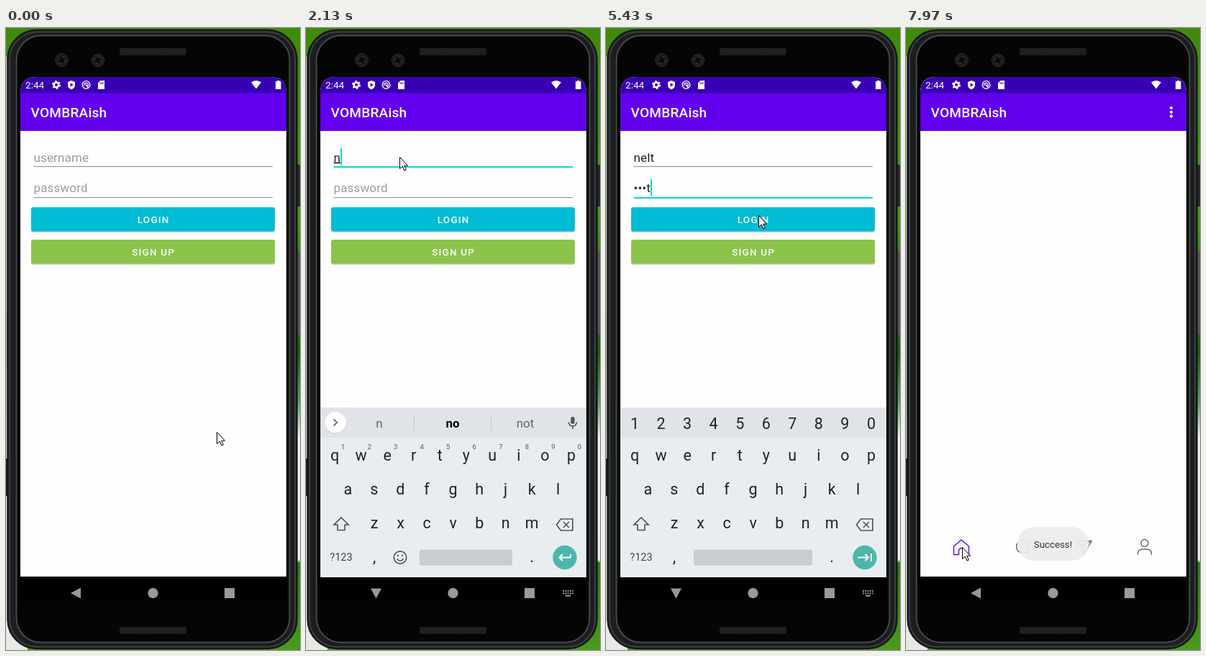
Recreate the animation shown at these times as an HTML page. Size 409x864 px, loop 8000 ms.

```html
<!DOCTYPE html>
<html lang="en">
<head>
<meta charset="utf-8">
<title>Login demo</title>
<style>
  html, body { margin: 0; height: 100%; overflow: hidden; }
  svg { display: block; width: 100vw; height: 100vh; }
  text { font-family: Roboto, sans-serif; white-space: pre; }
  .mid { text-anchor: middle; }
  .field { font-size: 17px; letter-spacing: .15px; fill: #222; }
  .hint { fill: #9c9c9c; }
  .title { font-size: 19px; font-weight: 500; letter-spacing: .24px; fill: #fff; }
  .button { font-size: 13.5px; font-weight: 500; letter-spacing: 1.2px; fill: #fff; text-anchor: middle; }
  .key { font-size: 21.5px; fill: #14262d; text-anchor: middle; }
  .sup { font-size: 9.5px; fill: #4a5860; text-anchor: middle; }
  .word { font-size: 17px; fill: #5c676d; text-anchor: middle; }
  .line { fill: none; stroke: #4c585e; stroke-width: 1.7; }
  .tab { fill: none; stroke: #666; stroke-width: 1.4; }
</style>
</head>
<body>
<svg viewBox="0 0 409 864">
  <defs>
    <clipPath id="screen"><path d="M20 795V90Q20 68 42 68H368Q390 68 390 90V795Z"/></clipPath>
    <clipPath id="loginShape"><rect x="35" y="249" width="339" height="33.500" rx="3"/></clipPath>
    <linearGradient id="wall" x2="0" y2="1">
      <stop offset="0" stop-color="#3f8a0a"/><stop offset=".3" stop-color="#4d9a14"/>
      <stop offset=".52" stop-color="#1f5a0c"/><stop offset=".6" stop-color="#5f9a68"/>
      <stop offset=".66" stop-color="#eef2ef"/><stop offset=".855" stop-color="#e8eeea"/>
      <stop offset=".86" stop-color="#2f7d0c"/><stop offset="1" stop-color="#4a9a1c"/>
    </linearGradient>
    <pattern id="mesh" width="4" height="4" patternUnits="userSpaceOnUse">
      <rect width="4" height="4" fill="#161616"/><path d="M0 4L4 0M0 0L4 4" stroke="#303030" stroke-width=".8"/>
    </pattern>
  </defs>

  <!-- wallpaper and phone body -->
  <rect width="409" height="864" fill="url(#wall)"/>
  <path d="M0 40H1.500V600H0Z" fill="#c9ccc9"/><path d="M0 598H3V650H0Z" fill="#222"/>
  <path d="M0 650H3L30 864H0Z" fill="#e6e9e6"/>
  <path d="M404 190H409V248H404Z" fill="#26282b"/><path d="M404 310H409V426H404Z" fill="#55545c"/>
  <rect x="2" y="2.500" width="403" height="860" rx="41" fill="#1b1d1e" stroke="#141516" stroke-width="1.500"/>
  <rect x="5" y="5.500" width="397" height="854" rx="38" fill="none" stroke="#3c3f41" stroke-width="2"/>
  <rect x="14.500" y="10.500" width="380" height="843" rx="34" fill="#050505" stroke="#4a4d4f" stroke-width="1.800"/>
  <rect x="158" y="28" width="93" height="9.500" rx="2" fill="url(#mesh)"/>
  <rect x="158" y="832" width="93" height="9.500" rx="2" fill="url(#mesh)"/>
  <g fill="#1c1d1f" stroke="#26282a">
    <circle cx="77.500" cy="44.500" r="9"/><circle cx="128" cy="45" r="9"/>
    <g fill="#0c0c0d" stroke="#4a4c50" stroke-dasharray="3 4"><circle cx="77.500" cy="44.500" r="4.500"/><circle cx="128" cy="45" r="4.500"/></g>
  </g>

  <g clip-path="url(#screen)">
    <path d="M20 762H390V796H20Z"/>
    <g id="login">
      <path d="M20 68H390V762H20Z" fill="#fefefe"/>
      <path d="M20 68H390V91H20Z" fill="#3700b3"/>
      <path d="M20 90.500H390V143H20Z" fill="#6200ee"/>
      <text class="title" x="34.500" y="124">VOMBRAish</text>
      <rect id="userLine" x="38.500" width="332.500"/><rect id="passLine" x="38.500" width="332.500"/>
      <text id="user" class="field" x="38.500" y="185.500"></text>
      <text id="pass" class="field" x="38.500" y="228"></text>
      <rect id="caret" width="2" height="23" fill="#03dac5"/>
      <g fill="#000" opacity=".18"><rect x="35" y="250" width="339" height="34" rx="3"/><rect x="35" y="295" width="339" height="34" rx="3"/></g>
      <rect x="35" y="249" width="339" height="33.500" rx="3" fill="#00bcd4"/>
      <rect x="35" y="294" width="339" height="33.500" rx="3" fill="#8bc34a"/>
      <circle id="ripple" cx="215" cy="265" fill="#fff" opacity=".24" clip-path="url(#loginShape)"/>
      <text class="button" x="205.200" y="271">LOGIN</text>
      <text class="button" x="205.200" y="316">SIGN UP</text>
    </g>

    <rect id="dim" x="20" y="68" width="370" height="727" opacity=".22"/>
    <g id="home">
      <path d="M20 68H390V762H20Z" fill="#fefefe"/>
      <path d="M20 68H390V91H20Z" fill="#3700b3"/>
      <path d="M20 90.500H390V143H20Z" fill="#6200ee"/>
      <path d="M10 762H400V810H10Z"/>
      <text class="title" x="34.500" y="124">VOMBRAish</text>
      <g fill="#fff"><circle cx="369" cy="111" r="2.100"/><circle cx="369" cy="116.800" r="2.100"/><circle cx="369" cy="122.600" r="2.100"/></g>
      <g transform="translate(0 .5)">
        <path class="tab" style="stroke:#6200ee" d="M66.500 719.500L77 710.500L87.500 719.500V731H80.500V724Q77 720 73.500 724V731H66.500Z"/>
        <circle class="tab" cx="162.500" cy="720" r="9"/><path class="tab" d="M168.500 727L172 730.500"/>
        <path class="tab" d="M237.500 712H258L248 730L245 719ZM245 719L258 712"/>
        <circle class="tab" cx="332" cy="715" r="5"/><path class="tab" d="M322.500 731.500V729Q323 723.500 329 723.500H335Q341 723.500 341.500 729V731.500"/>
      </g>
    </g>
    <g id="toast">
      <rect x="155" y="693" width="99.500" height="47" rx="23.500" fill="#ececec" opacity=".92"/>
      <text class="mid" x="204.500" y="722" font-size="13.300" fill="#333">Success!</text>
    </g>

    <g id="keyboard">
      <path d="M20 527.500H390V763H20Z" fill="#e9edf1"/>
      <path id="strip" d="M20 527.500H390V569.500H20Z" fill="#e0e4e8"/>
      <g id="letters"></g>
      <path class="line" d="M49 680L59 690H54V697.500H44V690H39Z"/>
      <path class="line" d="M354.500 682H371V698H354.500L348.500 690ZM358 686L366 694M366 686L358 694"/>
      <text class="mid" x="49" y="740" font-size="14.500" fill="#37464d">?123</text>
      <text class="mid key" x="95" y="742" font-size="18">,</text><text class="mid key" x="314" y="742">.</text>
      <rect id="space" y="724.500" height="22" rx="3" fill="#c9cdd1"/>
      <circle cx="360" cy="735.500" r="16.700" fill="#4db6ac"/>
      <g fill="none" stroke="#fff" stroke-width="2">
        <path id="enter" d="M368 731V735.500H353M357 731L352.500 735.500L357 740"/>
        <path id="next" d="M350 735.500H365M360.500 731L365 735.500L360.500 740M369 730V741"/>
      </g>
      <g id="textMode">
        <circle class="line" cx="131" cy="735.500" r="8.700"/>
        <path class="line" d="M126.500 737.500Q131 743 135.500 737.500M128 731.500V734M134 731.500V734"/>
        <circle cx="41" cy="549" r="14.500" fill="#c4c9cd"/><circle cx="41" cy="548" r="14.500" fill="#fff"/>
        <path id="chevron" class="line" d="M38.500 543.500L43 548L38.500 552.500"/>
        <g id="words">
          <path d="M150.500 537V559.500M257.500 537V559.500" stroke="#c3c9cd"/>
          <text class="word" x="102" y="555"></text>
          <text class="word" x="204" y="555" style="fill:#000;font-weight:700"></text>
          <text class="word" x="305" y="555"></text>
        </g>
        <g id="tools" class="line">
          <path d="M87 539H105V551L99 557H87ZM99 557V551H105"/>
          <path d="M141 540H161V556H141Z"/><text class="mid" x="151" y="551.500" font-size="8.500" font-weight="700" fill="#4c585e" stroke="none">GIF</text>
          <circle cx="206" cy="548" r="5"/><circle cx="206" cy="548" r="8" stroke-dasharray="3.140" stroke-width="4"/>
          <path d="M253 541H269V557H253ZM257 541V538.500H265V541"/>
          <circle cx="316" cy="548" r="9.500"/><path d="M311 547V549M315 543V545M320 545V547"/>
        </g>
        <rect x="368.300" y="540" width="5.400" height="10" rx="2.700" fill="#4c585e"/>
        <path class="line" d="M365.500 547.500Q366 553 371 553Q376 553 376.500 547.500M371 553V557"/>
      </g>
    </g>

    <!-- status bar -->
    <g fill="#fff">
      <text x="27" y="84" font-size="13.600">2:44</text>
      <circle cx="70" cy="79" r="3.300" fill="none" stroke="#fff" stroke-width="2.600"/>
      <circle cx="70" cy="79" r="5" fill="none" stroke="#fff" stroke-width="2" stroke-dasharray="2.620"/>
      <path d="M91 73L96 75V79Q96 83.500 91 85.500Q86 83.500 86 79V75Z"/><path d="M89.500 76.500L94 79L89.500 81.500Z" fill="#3700b3"/>
      <circle cx="111.500" cy="79" r="5.300" fill="none" stroke="#fff" stroke-width="1.300"/>
      <path d="M108.500 80A3 3 0 1 1 114 81L110.500 78.500L114 82.500" fill="none" stroke="#fff" stroke-width="1.300"/>
      <path d="M131.500 73H137V85H128V76.500Z"/><path d="M131 75.500V78M133 75.500V78M135 75.500V78" stroke="#3700b3"/>
      <path d="M341 75.500Q348 70.500 355 75.500L348 84.500Z"/>
      <path d="M375 74.300H377V73H380.500V74.300H382.500V85H375Z"/>
    </g>

    <!-- navigation bar -->
    <g id="nav">
      <path id="back" d="M90 785L104 777.500V792.500Z"/><circle cx="204.500" cy="785" r="7.200"/><path d="M304 778H318V792H304Z"/>
    </g>
    <g id="imeIcon" fill="none" stroke="#999" stroke-width="2" stroke-dasharray="2 1.300">
      <path d="M357 782H372M357 785.300H372"/><path d="M361 788.600H368" stroke-dasharray="none"/>
    </g>
  </g>

  <path id="pointer" d="M.5 .5V16.500L4.200 13L7 19L9.300 18L6.700 12.200H11.500Z" fill="#fff" stroke="#000"/>
</svg>

<script>
const LOOP = 8000, LAUNCH = 6890;
const $ = id => document.getElementById(id);
const set = (id, attrs) => { for (const k in attrs) $(id).setAttribute(k, attrs[k]); };
const show = (id, on) => { $(id).style.display = on ? '' : 'none'; };

// Values of the last entry that has started
const at = (track, t) => track.filter(e => e[0] <= t).pop().slice(1);

const pointer = [
  [0, 293, 561], [130, 250, 479], [280, 222, 351], [430, 195, 285], [550, 170, 238], [670, 150, 205],
  [790, 139, 184], [940, 130, 179], [4630, 48, 136], [4780, 184, 215], [4930, 218, 272], [5050, 213, 295],
  [5190, 211, 278], [5310, 213, 266], [5430, 212, 260], [5820, 211, 259], [6080, 214, 263], [6200, 215, 265],
  [7040, 218, 263], [7160, 224, 258], [7290, 227, 256], [7550, 172, 433], [7690, 125, 580], [7820, 90, 677],
  [7970, 78, 721]
];
const userText = [[0, ''], [2130, 'n'], [2280, 'ne'], [2400, 'nel'], [2520, 'nelt']];
const passText = [[0, ''], [3570, 'n'], [3820, '•e'], [4190, '••l'], [4340, '•••t'], [5820, '••••']];
const focus = [[0, ''], [1090, 'user'], [3020, 'pass']];
const caretOn = [[0, 0], [1090, 1], [1600, 0], [2130, 1], [3450, 0], [3570, 1], [5190, 0], [5430, 1], [5820, 0], [6320, 1]];
const words = [[0, '', '', ''], [2130, 'n', 'no', 'not'], [2280, 'ne', 'new', 'need'], [2400, 'nel', 'next', 'never'], [2520, 'nelt', 'felt', 'melt']];
const ripple = [[0, 0], [6080, 60], [6200, 200], [6320, 0]];
// opacity, scale, dx, dy
const keyboard = [[0, 0, 1, 0, 0], [1330, .6, 1, 0, 25], [1450, 1, 1, 0, 0], [LAUNCH, .55, 1.047, -9.6, -3.2], [7040, .2, 1.065, -13.3, 6], [7160, 0, 1, 0, 0]];
// home scale, login scale, toast opacity
const launch = [[0, 0, 1, 0], [LAUNCH, .9835, 1.038, .25], [7040, .995, 1.06, .6], [7160, 1, 1, .85], [7290, 1, 1, 1]];
const backTurn = [[0, 0], [1330, -45], [1450, -90], [LAUNCH, -24], [7040, 0]];

const row = (chars, x, y, cls) =>
  [...chars].map((c, i) => `<text class="${cls}" x="${x + 36.55 * i}" y="${y}">${c}</text>`).join('');
$('letters').innerHTML =
  row('qwertyuiop', 40, 600.5, 'key') + row('asdfghjkl', 58.3, 647.5, 'key') + row('zxcvbnm', 95, 695, 'key') +
  `<g id="digits">${row('1234567890', 40, 557, 'key')}</g><g id="sups">${row('1234567890', 51.5, 585, 'sup')}</g>`;

const zoom = s => `translate(205 476) scale(${s}) translate(-205 -476)`;

function field(id, text, hint, y, focused) {
  $(id).textContent = text || hint;
  $(id).classList.toggle('hint', !text);
  set(id + 'Line', { y, height: focused ? 2 : 1, fill: focused ? '#03dac5' : '#8c8c8c' });
}

function draw(t) {
  const [focused] = at(focus, t), [user] = at(userText, t), [pass] = at(passText, t);
  field('user', user, 'username', 192, focused === 'user');
  field('pass', pass, 'password', 235, focused === 'pass');
  $('user').style.textDecoration = user && focused === 'user' ? 'underline 1px' : 'none';

  const typed = focused === 'pass' ? pass : user;
  const width = typed ? $(focused).getComputedTextLength() : 0;
  set('caret', { x: 38.5 + width, y: focused === 'pass' ? 210 : 167 });
  show('caret', at(caretOn, t)[0]);
  set('ripple', { r: at(ripple, t)[0] });

  const [alpha, size, dx, dy] = at(keyboard, t);
  const secret = focused === 'pass';
  set('keyboard', { opacity: alpha, transform: `translate(${dx} ${dy}) scale(${size})` });
  show('keyboard', alpha);
  for (const id of ['textMode', 'enter', 'sups']) show(id, !secret);
  for (const id of ['next', 'digits']) show(id, secret);
  show('strip', t < LAUNCH);
  set('space', secret ? { x: 122, width: 165 } : { x: 158, width: 129 });
  show('words', user);
  show('tools', !user);
  set('chevron', { transform: user ? '' : 'rotate(180 41 548)' });
  const shown = at(words, t);
  $('words').querySelectorAll('text').forEach((el, i) => { el.textContent = shown[i]; });

  const [homeScale, loginScale, toast] = at(launch, t);
  set('login', { transform: zoom(loginScale) });
  set('home', { transform: zoom(homeScale) });
  show('home', homeScale);
  show('dim', homeScale);
  set('toast', { opacity: toast });

  set('back', { transform: `rotate(${at(backTurn, t)[0]} 97.5 785)` });
  set('nav', { fill: t >= LAUNCH && t < 7040 ? '#c9cbcc' : '#999' });
  show('imeIcon', t >= 1210 && t < LAUNCH);
  set('pointer', { transform: `translate(${at(pointer, t)})` });
}

function frame() {
  draw(performance.now() % LOOP);
  requestAnimationFrame(frame);
}
frame();
</script>
</body>
</html>
```
